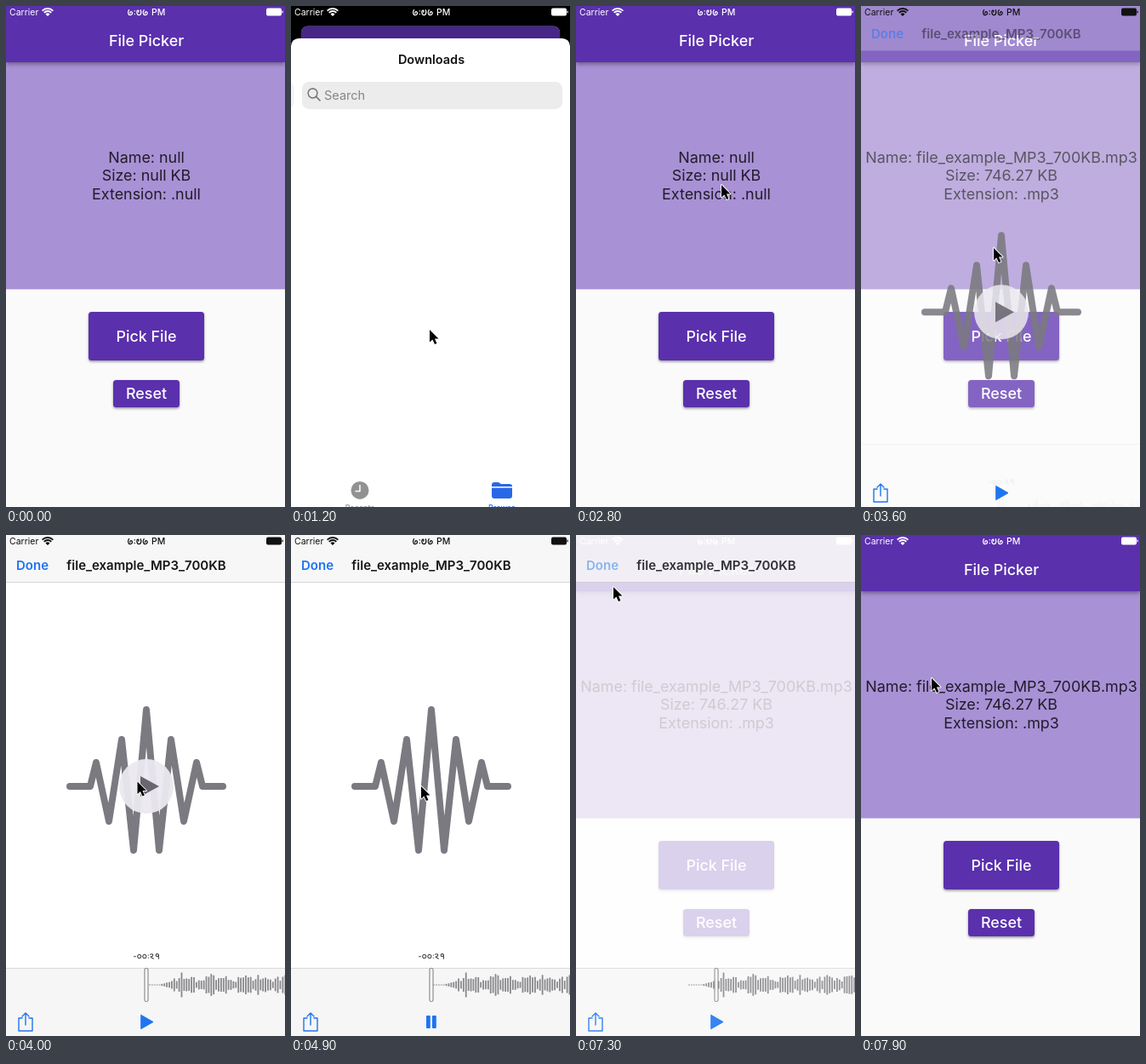
Recreate the animation shown at these times as an HTML page with a canvas. Size 328 by 588 pixels, loop 8 s.

```html
<!DOCTYPE html>
<html>
<head>
<meta charset="utf-8">
<style>
html, body { margin: 0; width: 100%; height: 100%; overflow: hidden; background: #fafafa; }
canvas { display: block; width: 328px; height: 588px; }
</style>
</head>
<body>
<canvas id="stage"></canvas>
<script>
const W = 328, H = 588, LOOP = 8000;
const PURPLE = '#5a30ad', BLUE = '#1f74f2', GREY = '#7b7a81';
const canvas = document.getElementById('stage');
const ratio = window.devicePixelRatio || 1;
canvas.width = W * ratio;
canvas.height = H * ratio;
const c = canvas.getContext('2d');

const clamp = v => Math.max(0, Math.min(1, v));
const span = (t, a, b) => clamp((t - a) / (b - a));
const smooth = p => p * p * (3 - 2 * p);

function layer(alpha, draw) {
  c.save();
  c.globalAlpha *= clamp(alpha);
  draw();
  c.restore();
}

function box(x, y, w, h, color, r = 0) {
  c.fillStyle = color;
  c.beginPath();
  c.roundRect(x, y, w, h, r);
  c.fill();
}

function text(s, x, y, size, color, weight = 400, align = 'center') {
  c.font = `${weight} ${size}px Inter, Roboto, sans-serif`;
  c.textAlign = align;
  c.fillStyle = color;
  c.fillText(s, x, y);
}

function shape(d, x, y, fill, stroke, width = 1, scale = 1) {
  const path = new Path2D(d);
  c.save();
  c.translate(x, y);
  c.scale(scale, scale);
  c.lineCap = c.lineJoin = 'round';
  if (stroke) { c.strokeStyle = stroke; c.lineWidth = width; c.stroke(path); }
  if (fill) { c.fillStyle = fill; c.fill(path); }
  c.restore();
}

function shadow(blur, y, draw) {
  c.save();
  c.shadowColor = 'rgba(0,0,0,.4)';
  c.shadowBlur = blur * ratio;
  c.shadowOffsetY = y * ratio;
  draw();
  c.restore();
}

// Bengali numerals as strokes, in a 6 by 7 cell
const NUMERALS = {
  0: 'M3 1.2A2.5 2.6 0 1 0 3.01 1.2',
  2: 'M.5 1C3 -.5 5 1 4 3L1 4.5 5 7',
  3: 'M2.4 3.4C3.4 1.2 .6 .6 .5 3S1.2 6.9 3.2 6.9 6.2 4 5 1',
  5: 'M1 0C1 3 0 7 3 7S5.5 4 1 3.5M5 0V2',
  6: 'M1.6 .8C-.2 3 .4 7 3 7S6.2 4.6 5.2 3.4 2.6 3.2 3 4.8',
  7: 'M5 7V2C5 -.5 1 -.5 1 2S4.5 4 4.8 2.5',
  ':': 'M1 2V2.2M1 5.8V6',
  '-': 'M0 4H2.5'
};

function numerals(s, x, y, color, scale) {
  for (const ch of s) {
    shape(NUMERALS[ch], x, y, null, color, 1.3, scale);
    x += (ch === ':' ? 3.2 : ch === '-' ? 4.5 : 7.4) * scale;
  }
}

function statusBar(color) {
  text('Carrier', 4, 11, 10.5, color, 400, 'left');
  c.strokeStyle = c.fillStyle = color;
  c.lineWidth = 1.8;
  c.lineCap = 'butt';
  for (const r of [6, 9]) {
    c.beginPath();
    c.arc(49, 12, r, -2.36, -0.78);
    c.stroke();
  }
  c.beginPath();
  c.moveTo(49, 12);
  c.arc(49, 12, 3.6, -2.36, -0.78);
  c.fill();
  numerals('6:36', 143, 3.8, color, 0.98);
  text('PM', 171, 11, 10.5, color, 500, 'left');
  box(306, 2.5, 18, 9, color, 2);
  box(324.5, 5.5, 1.2, 2.8, color, 0.6);
}

function button(label, x, y, w, h, base) {
  shadow(3, 1.5, () => box(x, y, w, h, PURPLE, 3.5));
  text(label, 165, base, 17.9, '#fff', 500);
}

function app(picked) {
  box(0, 0, W, H, '#fafafa');
  box(0, 60, W, 272.5, '#a991d5');
  shadow(5, 2, () => box(0, 0, W, 66, PURPLE));
  text('File Picker', 165, 47, 17.9, '#fff', 500);
  const lines = picked
    ? ['Name: file_example_MP3_700KB.mp3', 'Size: 746.27 KB', 'Extension: .mp3']
    : ['Name: null', 'Size: null KB', 'Extension: .null'];
  lines.forEach((s, i) => text(s, 165, 184 + i * 21.4, 17.9, '#211c2b'));
  button('Pick File', 97, 359, 136, 57, 393.5);
  button('Reset', 126, 439, 78, 32, 461);
}

function sheet(y, t) {
  c.save();
  c.translate(0, y - 38);
  box(0, 38, W, H + 20, '#fff', [9, 9, 0, 0]);
  text('Downloads', 165, 68, 14.5, '#111', 600);
  if (t < 1300) box(-20, 89, 24, 32, '#f4f4f4', 8);
  box(13, 89, 306, 32, '#ececed', 8);
  shape('M5.5 0A5.5 5.5 0 1 0 5.51 0M9.5 9.5L14 14', 20, 97, null, '#77777b', 1.5);
  text('Search', 39, 110, 14.5, '#85858a', 400, 'left');
  c.fillStyle = '#929292';
  c.beginPath();
  c.arc(81, 568.5, 10.5, 0, 7);
  c.fill();
  shape('M0 -6V1H-5', 81, 568.5, null, '#fff', 1.5);
  text('Recents', 81, 592, 9, '#929292', 500);
  shape('M0 3Q0 0 3 0H8L11 2H21Q24 2 24 4.5V5H0ZM0 6.5H24V16Q24 19 21 19H3Q0 19 0 16Z', 236, 559, '#2868e8');
  text('Browse', 248, 592, 9, '#2868e8', 500);
  c.restore();
}

// Loudness along the track: [distance, half height]
const LOUD = [[0, .5], [16, .5], [26, 5], [34, 8], [40, 15], [44, 10], [52, 11], [64, 5],
  [70, 14], [81, 14], [85, 6], [91, 16], [97, 6], [106, 7], [113, 15], [124, 9], [135, 12],
  [146, 7], [155, 10], [163, 14], [176, 7], [192, 16], [205, 7], [220, 15]];

function loudness(x) {
  const i = LOUD.findIndex(p => p[0] > x);
  if (i < 1) return 9;
  const [x0, a] = LOUD[i - 1], [x1, b] = LOUD[i];
  return a + (b - a) * (x - x0) / (x1 - x0);
}

function scrubber(t, drop) {
  const played = 15 * (Math.max(4850, Math.min(7050, t)) - 4850) / 1000;
  c.save();
  c.translate(0, drop);
  for (let d = 0; d < 215; d += 2.9) {
    const x = 165 + d - played;
    if (x > W) break;
    const jitter = d < 18 ? 1 : 0.75 + 0.35 * Math.sin(d * 2.3) * Math.cos(d * 0.7);
    const h = Math.max(0.5, loudness(d) * jitter);
    box(x, 528 - h, 1.8, h * 2, '#88888d');
  }
  box(163, 508.5, 4, 39, '#fff', 1.5);
  c.strokeStyle = '#77777b';
  c.lineWidth = 1;
  c.beginPath();
  c.roundRect(163, 508.5, 4, 39, 1.5);
  c.stroke();
  if (t < 7200) numerals('-00:2' + (7 - Math.floor(played / 15)), 150.5, 491.5, '#444', 0.83);
  c.restore();
}

const WAVE = 'M75 0H99L106 -28 121 41 136 -55 150 75 165 -90 180 75 194 -55 209 41 224 -28 231 0H255';

function viewer(t, a) {
  const entering = t < 5000;
  const rest = entering ? 1 - span(t, 3500, 3900) : 0;
  const drop = 115 * rest * rest;
  const playing = t >= 4750 && t < 7050;
  const ink = Math.sqrt(a);

  layer(a, () => box(0, 0, W, H, '#fff'));
  layer(entering ? a * 3.5 : 1 - span(t, 7200, 7280), () => {
    shape(WAVE, 0, 295 + drop, null, GREY, 8);
    if (t < 4700) {
      c.fillStyle = 'rgba(235,233,240,.95)';
      c.beginPath();
      c.arc(165, 295 + drop, 32, 0, 7);
      c.fill();
      shape('M0 -12L22 0 0 12Z', 158, 295 + drop, '#69666f');
    }
  });

  layer(a, () => {
    box(0, 0, W, 55 - 4 * rest, '#f7f7f7');
    box(0, 55 - 4 * rest, W, 0.8, '#c9c9cb');
    box(0, 508 + 8 * rest, W, 80, '#f6f6f6');
    box(0, 508 + 8 * rest, W, 0.8, '#cfcfd1');
  });
  layer(ink, () => {
    text('Done', 12, 41 - 4 * rest, 15, t > 7050 ? '#78afef' : BLUE, 600, 'left');
    text('file_example_MP3_700KB', 165, 41 - 4 * rest, 15, '#16161a', 600);
  });
  layer(entering ? a * a : ink, () => scrubber(t, drop));
  layer(entering ? a * 4 : ink, () => {
    shape('M5 7H1V22H17V7H13M9 15V1M5 5L9 1 13 5', 14, 560, null, BLUE, 1.4);
    if (playing) {
      box(159, 564, 4.8, 15, BLUE, 1);
      box(166, 564, 4.8, 15, BLUE, 1);
    } else {
      shape('M0 0L14 8 0 16Z', 159, 563.5, BLUE, BLUE, 1);
    }
  });
}

// Pointer stops: [time, x, y]
const STOPS = [[250, 168, 470], [550, 163, 380], [1400, 163, 380], [2000, 171, 210],
  [2900, 171, 210], [3500, 156, 284], [3700, 156, 284], [4300, 153, 295], [5700, 153, 295],
  [6700, 34, 36], [7100, 34, 36], [7300, 44, 61], [7900, 83, 168], [8000, 83, 168]];

function pointer(t) {
  if (t < STOPS[0][0]) return;
  const i = STOPS.findIndex(s => s[0] > t);
  const [t0, x0, y0] = STOPS[i - 1], [t1, x1, y1] = STOPS[i];
  const p = smooth(span(t, t0, t1));
  shape('M0 0V14.5L3.4 11.4 6 17 8.4 16 6 10.5H10.5Z',
    x0 + (x1 - x0) * p, y0 + (y1 - y0) * p, '#000', '#fff', 1.8);
}

function render(t) {
  c.setTransform(ratio, 0, 0, ratio, 0, 0);
  c.clearRect(0, 0, W, H);
  const up = t < 800 ? 0 : t < 2250
    ? 1 - Math.exp(-(t - 800) / 104)
    : 1 - smooth(span(t, 2250, 2750));
  const shown = t < 5000 ? span(t, 3500, 3900) : 1 - span(t, 7200, 7655);

  if (up > 0) {
    box(0, 0, W, H, '#000');
    c.save();
    const inset = 12 * up, s = 1 - 2 * inset / W;
    c.translate(inset, 24 * up);
    c.scale(s, s);
    c.beginPath();
    c.roundRect(0, 0, W, H + 40, 9 * up);
    c.clip();
    app(false);
    box(0, 0, W, H + 40, `rgba(0,0,0,${0.22 * up})`);
    c.restore();
    sheet(H - 562 * up, t);
  } else {
    app(t > 3000);
  }
  if (shown > 0) viewer(t, shown);
  statusBar(shown > 0 && t < 7200 ? '#111' : '#fff');
  pointer(t);
}

const start = performance.now();
function tick() {
  render((performance.now() - start) % LOOP);
  requestAnimationFrame(tick);
}
tick();
</script>
</body>
</html>
```
